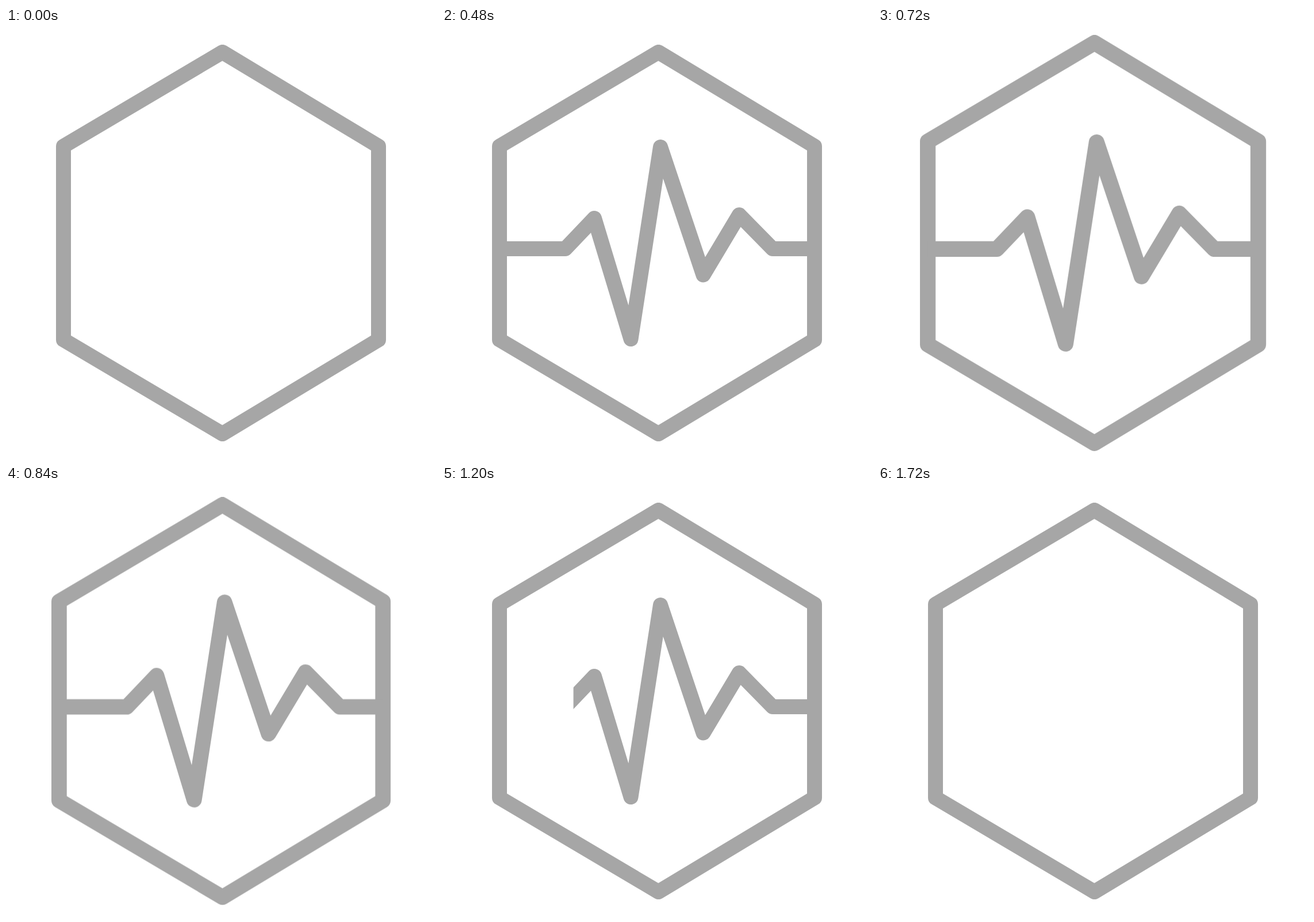
Animation of 748x748 px, one loop 2.22 s. Source, as an HTML page without scripts:

```html
<!DOCTYPE html>
<html lang="en">
<head>
<meta charset="utf-8">
<title>Pulse</title>
<style>
  html, body { margin: 0; height: 100%; overflow: hidden; background: #fff; }
  svg { display: block; width: 100%; height: 100%; }

  .icon {
    fill: none;
    stroke: #a6a6a6;
    stroke-width: 26;
    stroke-linejoin: round;
    transform-origin: 374px 374px;
    animation: beat 2220ms -1ms infinite;
  }
  .window { animation: sweep 2220ms -1ms infinite; }

  /* Every move advances in 40 ms ticks. */
  @keyframes beat {
    0%        { transform: scale(1); animation-timing-function: step-end; }
    21.6216%  { transform: scale(1); animation-timing-function: steps(6); }
    32.4324%  { transform: scale(1.049); animation-timing-function: steps(7); }
    45.045%, 100% { transform: scale(1); animation-timing-function: step-end; }
  }
  /* The window slides in over the trace, rests, then slides off to the right. */
  @keyframes sweep {
    0%        { transform: translateX(-589px); animation-timing-function: steps(12); }
    21.6216%  { transform: translateX(0); animation-timing-function: step-end; }
    45.045%   { transform: translateX(0); animation-timing-function: steps(18); }
    77.4775%, 100% { transform: translateX(589px); animation-timing-function: step-end; }
  }
</style>
</head>
<body>
<svg viewBox="0 0 748 748">
  <clipPath id="reveal">
    <rect class="window" x="65" y="150" width="589" height="450"/>
  </clipPath>
  <g class="icon">
    <path d="M376.5 42 648 205.6V542.4L376.5 706 100 542.4V205.6Z"/>
    <g clip-path="url(#reveal)">
      <path d="M100 384H214.5L265 331 328.5 541 380 207 454.5 429.5 517 325 575 384H648"/>
    </g>
  </g>
</svg>
</body>
</html>
```
